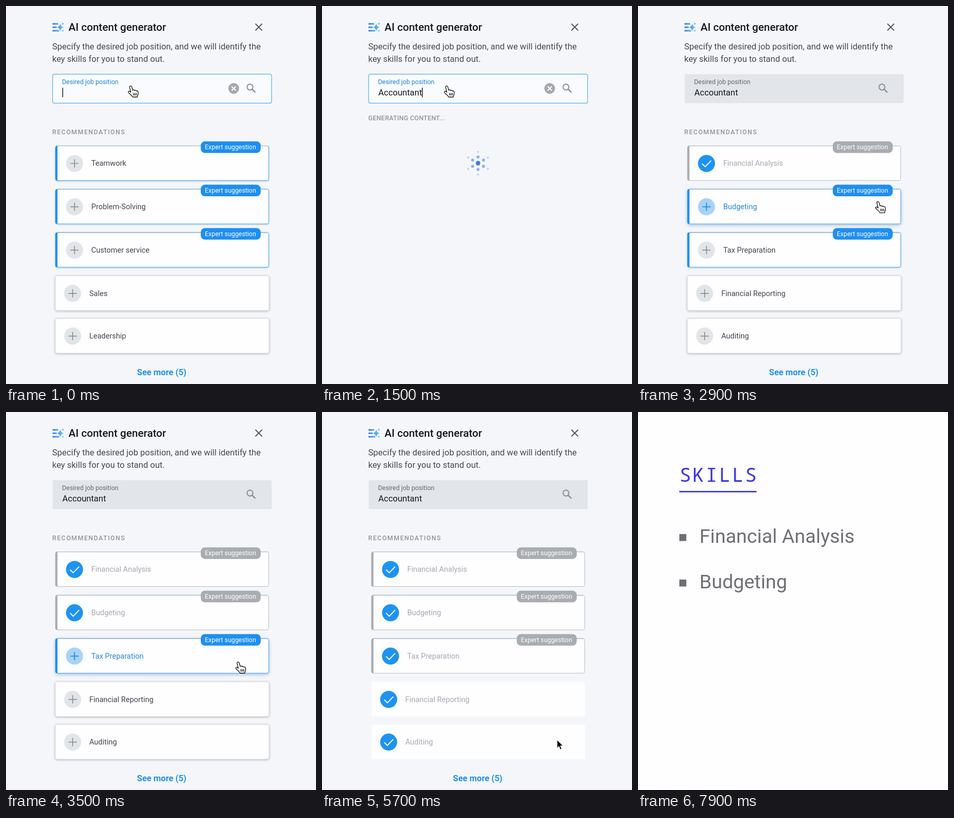
These frames come from a looping animation (600x731 px, 8 s). An HTML page:

```html
<!DOCTYPE html>
<html lang="en">
<head>
<meta charset="utf-8">
<title>AI content generator</title>
<style>
  html, body { margin: 0; width: 100%; height: 100%; overflow: hidden; background: #fefdff; }
  svg { display: block; width: 600px; height: 731px; }
  text { font-family: Roboto, sans-serif; white-space: pre; }
  .line { fill: none; stroke-linecap: butt; }
  .body { font-size: 16.5px; fill: #47494d; }
  .caps { font-size: 12.36px; font-weight: 500; fill: #909397; }
  .item { font-size: 14.5px; fill: #45474b; }
  .badge text { font-size: 12.36px; fill: #fff; }
  .badge rect { fill: #1f8ff0; }
  .disc { fill: #e2e5e8; }
  .plus { stroke: #8d9196; stroke-width: 1.7; }
  .check { stroke: #fff; stroke-width: 1.9; display: none; }
  .box { fill: #fefdff; stroke: #d9dce1; stroke-width: 1; filter: drop-shadow(0 1px 2px #0004); }
  .expert .box { stroke: #4aa3ea; filter: drop-shadow(0 1px 1.5px #1f6fb055); }
  .top { stroke: #a3b1be; stroke-width: 1; }
  .bar { fill: #1f8ff0; }

  .hover .item { fill: #2389dc; }
  .hover .disc { fill: #a9d2f7; }
  .hover .plus { stroke: #2389dc; }
  .hover .box { filter: drop-shadow(0 2px 3px #1f6fb066); }

  .done .item { fill: #a6a9ad; }
  .done .disc { fill: #1f93f2; }
  .done .plus { display: none; }
  .done .check { display: inline; }
  .done .box { stroke: none; filter: none; }
  .done.expert .box { stroke: #b6babf; }
  .done .bar, .done .badge rect { fill: #a9adb1; }

  #field rect { fill: #fafbfe; stroke: #53b0ee; stroke-width: 1.2; }
  #field .label { font-size: 12.36px; fill: #1c86d8; }
  #field.off rect { fill: #e2e5e9; stroke: none; }
  #field.off .label { fill: #65686c; }
  #field.off #clear { display: none; }
  .skill { font-size: 37.6px; fill: #707074; }
</style>
</head>
<body>
<svg viewBox="0 0 600 731">
  <defs>
    <linearGradient id="tint" gradientUnits="userSpaceOnUse" x1="90" y1="0" x2="112" y2="0">
      <stop stop-color="#2f78e2"/><stop offset="1" stop-color="#72c6f4"/>
    </linearGradient>
  </defs>

  <rect width="600" height="731" fill="#fefdff"/>
  <g id="resume">
    <text x="80.2" y="135" fill="#3d36e2" style="font:400 37.5px 'Noto Sans Mono',monospace;letter-spacing:2.9px">SKILLS</text>
    <rect x="80" y="152.7" width="149.5" height="2.6" fill="#2f29df"/>
    <g class="skill" id="skill0">
      <rect x="80" y="236" width="13.5" height="13.5"/><text x="119" y="253">Financial Analysis</text>
    </g>
    <g class="skill" id="skill1">
      <rect x="80" y="324" width="13.5" height="13.5"/><text x="119" y="341">Budgeting</text>
    </g>
  </g>

  <g id="panel">
    <rect width="600" height="731" fill="#f4f6fa"/>
    <path class="line" stroke="url(#tint)" stroke-width="2.8" d="M90 34.6H101M90 41.2H98M90 47.8H103"/>
    <path fill="url(#tint)" d="M105 33.5Q106 40.2 112 41.2Q106 42.2 105 49Q104 42.2 98.5 41.2Q104 40.2 105 33.5ZM110 31.5Q110.4 33.8 112.6 34.2Q110.4 34.6 110 37Q109.6 34.6 107.5 34.2Q109.6 33.8 110 31.5ZM110 45.3Q110.4 47.4 112.4 47.8Q110.4 48.2 110 50.2Q109.6 48.2 107.6 47.8Q109.6 47.4 110 45.3Z"/>
    <text x="121" y="47.5" font-size="20.6" font-weight="500" fill="#16181b">AI content generator</text>
    <path class="line" stroke="#55585c" stroke-width="2" d="M482.7 34.2L495.7 47.2M495.7 34.2L482.7 47.2"/>
    <text class="body" x="89.5" y="83.5">Specify the desired job position, and we will identify the</text>
    <text class="body" x="89.5" y="108">key skills for you to stand out.</text>

    <g id="field">
      <rect x="90.3" y="131.8" width="423.8" height="56" rx="3"/>
      <text class="label" x="108.5" y="150.6">Desired job position</text>
      <text id="typed" x="109" y="172.6" font-size="16.5" fill="#17191c"></text>
      <rect id="caret" y="158" width="1.4" height="18.5" style="fill:#111;stroke:none"/>
      <g id="clear">
        <circle cx="440.7" cy="159.5" r="10.4" fill="#a5a8ac"/>
        <path class="line" stroke="#fff" stroke-width="2" d="M436.7 155.5l8 8m0-8l-8 8"/>
      </g>
      <g class="line" stroke="#8b8e92" stroke-width="2">
        <circle cx="472.2" cy="156.7" r="5.7"/><path d="M476.3 160.8L482.6 167.1" stroke-width="2.5"/>
      </g>
    </g>

    <g id="loading">
      <text class="caps" x="89.5" y="221" letter-spacing=".3">GENERATING CONTENT...</text>
      <g id="dots"></g>
    </g>
    <g id="list">
      <text class="caps" x="89.5" y="248" letter-spacing="1.45">RECOMMENDATIONS</text>
      <g id="cards"></g>
      <text x="253.5" y="714" font-size="16.5" font-weight="700" fill="#2090ea">See more (5)</text>
    </g>

    <g id="cursor" stroke-linejoin="round">
      <g id="hand" stroke="#111" stroke-width="1.3">
        <path fill="#fff" d="M-1.8 2.6C-2 .2 1.7 -.2 2.4 2.2L4.3 9C5.2 7.7 7.4 8 7.9 9.6C9 8.5 11 8.9 11.4 10.6C13 9.7 14.8 10.8 14.8 12.8L14.6 16.6L13 22H4.2C2.6 18.8-1.6 16.2-3.8 13.4C-5.2 11.4-3 9.9-1.4 11.1L.6 12.8Z"/>
        <path class="line" d="M5.6 14.2l.3 4.8M8.5 14.2v4.8M11.3 14.2v4.8"/>
      </g>
      <path id="arrow" fill="#050505" stroke="#fff" stroke-width="1" d="M0 0V16L3.7 12.6L6.3 18.8L9 17.6L6.4 11.6H11.3Z"/>
    </g>
  </g>
</svg>

<script>
const LOOP = 8000;
const JOB = "Accountant";
const TYPE_MS = 70, LOAD_AT = 800, LIST_AT = 1700;
const BEFORE = ["Teamwork", "Problem-Solving", "Customer service", "Sales", "Leadership"];
const AFTER = ["Financial Analysis", "Budgeting", "Tax Preparation", "Financial Reporting", "Auditing"];
const TOPS = [270.5, 354.3, 438.1, 521.8, 604.3];
const CLICKS = [2600, 3100, 3700, 4400, 5100];
// time, x, y of the cursor's hot spot
const PATH = [
  [0, 241, 154], [1800, 241, 154], [2350, 473, 307], [2650, 473, 307],
  [3000, 462, 395], [3150, 462, 395], [3450, 449, 483], [3750, 449, 483],
  [4150, 452, 566], [4450, 452, 566], [4700, 453, 597], [4950, 455, 634]
];

const $ = id => document.getElementById(id);
const clamp = v => Math.max(0, Math.min(1, v));
const ramp = (t, from, to) => clamp((t - from) / (to - from));
const ease = p => p * p * (3 - 2 * p);
const show = (el, on) => { el.style.display = on ? "" : "none"; };

function add(parent, name, attrs = {}, text = "") {
  const el = document.createElementNS("http://www.w3.org/2000/svg", name);
  for (const key in attrs) el.setAttribute(key, attrs[key]);
  el.textContent = text;
  return parent.appendChild(el);
}

function makeCard(top, i) {
  const expert = i < 3;
  const g = add($("cards"), "g");
  const left = expert ? 96 : 95.5, width = expert ? 412.5 : 413.5;
  const cx = expert ? 132.6 : 129, cy = top + 34;
  add(g, "rect", { class: "box", x: left, y: top, width, height: 67, rx: 3.5 });
  if (expert) {
    add(g, "path", { class: "line top", d: `M99 ${top}H506` });
    add(g, "path", { class: "bar", d: `M99.6 ${top}v67h-1.1q-3 0-3-3v-61q0-3 3-3z` });
    const badge = add(g, "g", { class: "badge" });
    add(badge, "rect", { x: 377, y: top - 8.7, width: 116, height: 22.4, rx: 8 });
    add(badge, "text", { x: 384.8, y: top + 6.7 }, "Expert suggestion");
  }
  add(g, "circle", { class: "disc", cx, cy, r: 16.5 });
  add(g, "path", { class: "line plus", d: `M${cx - 8} ${cy}h16m-8-8v16` });
  add(g, "path", { class: "line check", d: `M${cx - 8.5} ${cy + .5}l6 6l11.5-12` });
  const label = add(g, "text", { class: "item", x: expert ? 165 : 161.2, y: cy + 4.8 });
  return { g, label, expert, top };
}

const cards = TOPS.map(makeCard);

const dots = [{ r: 0, size: 5.2, el: add($("dots"), "circle", { fill: "#467ce2" }) }];
for (let k = 0; k < 6; k++) {
  const angle = (k * 60 - 90) * Math.PI / 180;
  const inner = k > 1 && k < 5 ? "#98a9f8" : "#8ab1f6";
  dots.push({ r: 13.2, size: 3.7, angle, el: add($("dots"), "circle", { fill: inner }) });
  dots.push({ r: 23.6, size: 2.4, angle, el: add($("dots"), "circle", { fill: "#b9cdf8" }) });
}

function cursorAt(t) {
  const next = PATH.findIndex(p => p[0] > t);
  if (next < 0) return PATH[PATH.length - 1].slice(1);
  const a = PATH[next - 1], b = PATH[next];
  const p = ease(ramp(t, a[0], b[0]));
  return [a[1] + (b[1] - a[1]) * p, a[2] + (b[2] - a[2]) * p];
}

function drawField(t) {
  $("field").setAttribute("class", t >= CLICKS[0] ? "off" : "");
  $("typed").textContent = JOB.slice(0, Math.floor(t / TYPE_MS));
  $("caret").setAttribute("x", 109 + $("typed").getComputedTextLength());
  show($("caret"), t < LIST_AT);
}

function drawLoader(t) {
  for (const d of dots) {
    const wave = Math.cos((t - 900) / 800 * 2 * Math.PI - d.r * .06) - Math.cos(d.r * .06);
    const r = d.r * (1 + .06 * wave);
    d.el.setAttribute("cx", 302 + (d.r ? r * Math.cos(d.angle) : 0));
    d.el.setAttribute("cy", 304 + (d.r ? r * Math.sin(d.angle) : 0));
    d.el.setAttribute("r", d.size * (1 + .15 * wave));
  }
}

function drawCards(t, x, y) {
  let active = false;
  cards.forEach((c, i) => {
    const done = t >= CLICKS[i];
    const hover = !done && x > 96 && x < 509 && y > c.top && y < c.top + 67;
    active = active || hover;
    c.g.setAttribute("class", (c.expert ? "expert" : "") + (done ? " done" : hover ? " hover" : ""));
    c.label.textContent = (t < LOAD_AT ? BEFORE : AFTER)[i];
  });
  return active;
}

function draw(t) {
  const [x, y] = cursorAt(t);
  const loading = t >= LOAD_AT && t < LIST_AT;
  show($("panel"), t < 6000);
  $("panel").style.opacity = 1 - ramp(t, 5700, 6000);
  drawField(t);
  show($("loading"), loading);
  show($("list"), !loading);
  drawLoader(t);
  const overCard = drawCards(t, x, y);
  const hand = overCard || y < 188;
  show($("hand"), hand);
  show($("arrow"), !hand);
  $("cursor").setAttribute("transform", `translate(${x} ${y})`);

  $("resume").style.opacity = ramp(t, 5900, 6300);
  $("skill0").style.opacity = ramp(t, 6850, 7050);
  $("skill1").style.opacity = ramp(t, 7200, 7450);
}

function tick() {
  draw(performance.now() % LOOP);
  requestAnimationFrame(tick);
}
tick();
</script>
</body>
</html>
```
